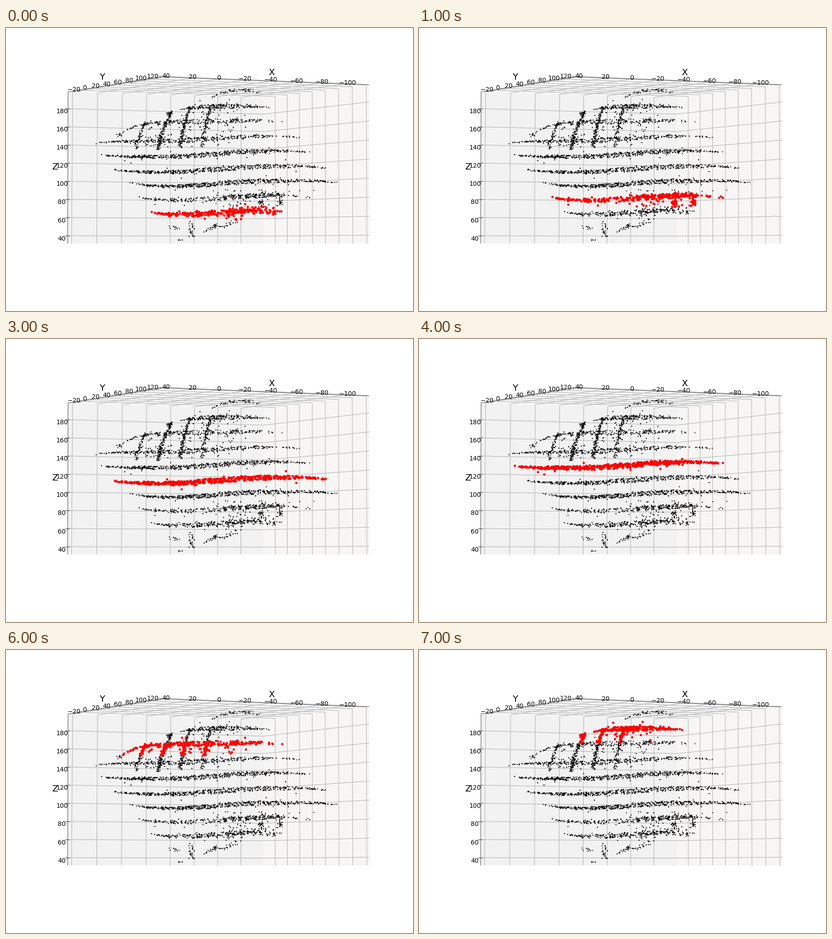
These frames come from a looping animation (898 px wide and 624 px high, 8000 ms). A matplotlib script:

```python
import numpy as np
import matplotlib.pyplot as plt
from matplotlib.animation import FuncAnimation

W, H = 898, 624
rng = np.random.default_rng(12)

plt.rcParams["font.family"] = "DejaVu Sans"
fig = plt.figure(figsize=(W / 100, H / 100), dpi=100, facecolor="white")
ax = fig.add_axes([0, 0, 1, 1])
ax.set_xlim(0, W)
ax.set_ylim(H, 0)
ax.axis("off")


def line(a, b, color="#b0b0b0", lw=0.8, z=2):
    ax.plot([a[0], b[0]], [a[1], b[1]], color=color, lw=lw, zorder=z,
            solid_capstyle="butt")


def tick(p, toward=(1, 0)):
    """A short dash across the axis at p."""
    d = np.subtract(p, toward) if toward != (1, 0) else np.array([1.0, 0.0])
    d = d / np.hypot(*d)
    line(p - 4 * d, p + 2 * d, "#333333", 0.7, 3)


def label(x, y, text, size=10):
    ax.text(x, y, str(text).replace("-", "\u2212"), size=size,
            ha="center", va="center", zorder=9)


# ---- box: left wall, right wall and ceiling
LEFT, APEX, RIGHT, BACK = (137, 141), (345, 107), (801, 125), (568, 154)
FLOOR = 475
LEFT_FOOT, RIGHT_FOOT, BACK_FOOT = (136, FLOOR), (802, FLOOR), (568, FLOOR)


def on_edge(a, b, x):
    return x, a[1] + (b[1] - a[1]) * (x - a[0]) / (b[0] - a[0])


for corners, color in (([LEFT, BACK, BACK_FOOT, LEFT_FOOT], "#f2f2f2"),
                       ([BACK, RIGHT, RIGHT_FOOT, BACK_FOOT], "#f7f6f5"),
                       ([LEFT, APEX, RIGHT, BACK], "#f6f6f6")):
    ax.fill(*zip(*corners), color=color, lw=0, zorder=1)


def wall_line(top):
    line(top, (top[0] + (top[0] - BACK[0]) * 0.0055, FLOOR))


for i in range(8):
    # X: left wall and ceiling
    wall = on_edge(LEFT, BACK, 147 + 55.4 * i - 0.33 * i * i)
    top = on_edge(APEX, RIGHT, 355 + 59.8 * i - 0.42 * i * i)
    wall_line(wall)
    line(wall, top)
    tick(top, wall)
    label(353 + 58.6 * i - 0.2 * i * i, 105.5 + 2.25 * i, 40 - 20 * i)

    # Y: right wall and ceiling
    wall = on_edge(BACK, RIGHT, 594 + 26.05 * i + 0.38 * i * i)
    top = on_edge(LEFT, APEX, 160 + 23.05 * i + 0.38 * i * i)
    wall_line(wall)
    line(wall, top)
    tick(top)
    label(150 + 23.2 * i + 0.23 * i * i, 136.5 - 4 * i - 0.04 * i * i,
          -20 + 20 * i)

    # Z: both walls
    left, back = (137, 178 + 40 * i), (568, 190 + 38.4 * i)
    line(left, back)
    line(back, (801.5, 163 + 42 * i))
    line((130, left[1]), (140, left[1]), "#333333", 0.8, 3)
    label(124 - 0.2 * i, 184 + 40.1 * i, 180 - 20 * i)

for a, b in ((LEFT, APEX), (APEX, RIGHT), (LEFT, LEFT_FOOT)):
    line(a, b, "#555555", 0.8, 3)

label(586, 98, "X", 14)
label(212, 108, "Y", 14)
label(108, 307, "Z", 14)

# ---- point cloud: rings 0-7 light up in turn, the rest never does
RINGS = [  # x start, x end, bend at start, height, rise, points
    (321, 607, -7, 413, 12, 210),
    (294, 670, -8, 381, 11, 200),
    (274, 730, -10, 350, 13, 480),
    (240, 705, -6, 318, 13, 460),
    (211, 670, -4, 284, 13, 480),
    (199, 647, 5, 249, 11, 310),
    (258, 609, 24, 207, 3, 220),
    (386, 580, 7, 173, 1, 200),
]
REST = len(RINGS)
cloud = [[] for _ in range(REST + 1)]


def add(k, x, y):
    cloud[k].append(np.column_stack([x, y]))


def ease(u):
    u = np.clip(u, 0, 1)
    return u * u * (3 - 2 * u)


def spread(sd, n):
    return np.clip(rng.normal(0, sd, n), -1.8 * sd, 1.8 * sd)


def level(k, x):
    x0, x1, bend, y, rise, _ = RINGS[k]
    return (y + bend * np.exp((x0 - x) / 32) - rise * ease((x - 340) / 250)
            + 3 * ease((x - x1 + 50) / 50))


def ring(k):
    """A flat loop seen almost edge on: two strands that meet at the ends."""
    x0, x1, *_, n = RINGS[k]
    t = rng.beta(1.5, 1.7, n)
    t[:2] = 0, 1
    x = x0 + (x1 - x0) * t
    side = rng.choice([-1, 1], n)
    gap = 2.6 * np.sin(np.pi * t)
    add(k, x, level(k, x) + side * gap + spread(1.5, n) * (0.5 + gap / 5))
    x = rng.uniform(x0 + 30, x1 - 60, 18)
    add(k, x, level(k, x) + spread(8, 18))


def blob(k, n, x, y, sx, sy):
    add(k, x + spread(sx, n), y + spread(sy, n))


def haze(k, n, x0, x1, y0, y1):
    add(k, rng.uniform(x0, x1, n), rng.uniform(y0, y1, n))


def rib(n, x, low, high, lean):
    """A steep strand, cut by height into the three upper rings."""
    t = rng.uniform(0, 1, n)
    y = low + (high - low) * t
    x = x + lean * t ** 1.5 + rng.normal(0, 1, n) * (2.6 - 1.3 * t)
    k = np.where(y > 232, 5, np.where(y > 205, 6, 7))
    for j in (5, 6, 7):
        add(j, x[k == j], y[k == j])


for k in range(REST):
    ring(k)

# knots along the two lowest rings
for i in range(8):
    x = 482 + 17 * i
    blob(1, 13, x, level(1, x) - 2, 2.8, 2.6)
    x = 488 + 15 * i
    blob(0, 9, x, level(0, x), 3, 4)
for x, dy in ((563, 15), (603, 13)):
    blob(1, 20, x, level(1, x) + dy, 3.5, 5)
haze(1, 16, 470, 590, 378, 394)
haze(0, 12, 480, 530, 412, 429)

haze(2, 18, 440, 682, 356, 366)
haze(5, 40, 285, 470, 233, 262)
haze(6, 40, 300, 510, 210, 231)
haze(7, 16, 360, 510, 180, 201)
blob(5, 8, 250, 236, 3, 2)
blob(7, 14, 360, 189, 4, 3)

rib(55, 287, 267, 208, 21)
rib(130, 336, 268, 183, 31)
rib(125, 385, 265, 173, 22)
rib(75, 433, 262, 178, 18)

# crown and foot
x = 453 + 107 * rng.beta(1.1, 1.2, 48)
add(REST, x, 137 + 15 * ((x - 520) / 67) ** 2 + spread(1.6, 48))
blob(REST, 26, 411, 443, 4, 9)
blob(REST, 14, 459, 437, 4, 4)
x = rng.uniform(436, 512, 28)
add(REST, x, 447 - 0.27 * (x - 436) + spread(3, 28))
haze(REST, 10, 358, 405, 436, 445)
haze(REST, 4, 376, 394, 466, 469)

layers = []
for part in cloud:
    xy = np.vstack(part)
    ink = np.zeros((len(xy), 4))
    ink[:, 3] = rng.uniform(0.68, 1, len(xy))
    dot = ax.scatter(xy[:, 0], xy[:, 1], linewidths=0)
    layers.append((dot, ink))


def update(step):
    for k, (dot, ink) in enumerate(layers):
        lit = k == step
        dot.set_facecolor("red" if lit else ink)
        dot.set_sizes([13.5 if lit else 3.7])
        dot.set_zorder(6 if lit else 5)
    return [dot for dot, _ in layers]


anim = FuncAnimation(fig, update, frames=REST, interval=1000, repeat=True,
                     repeat_delay=0, blit=False)
plt.show()
```
